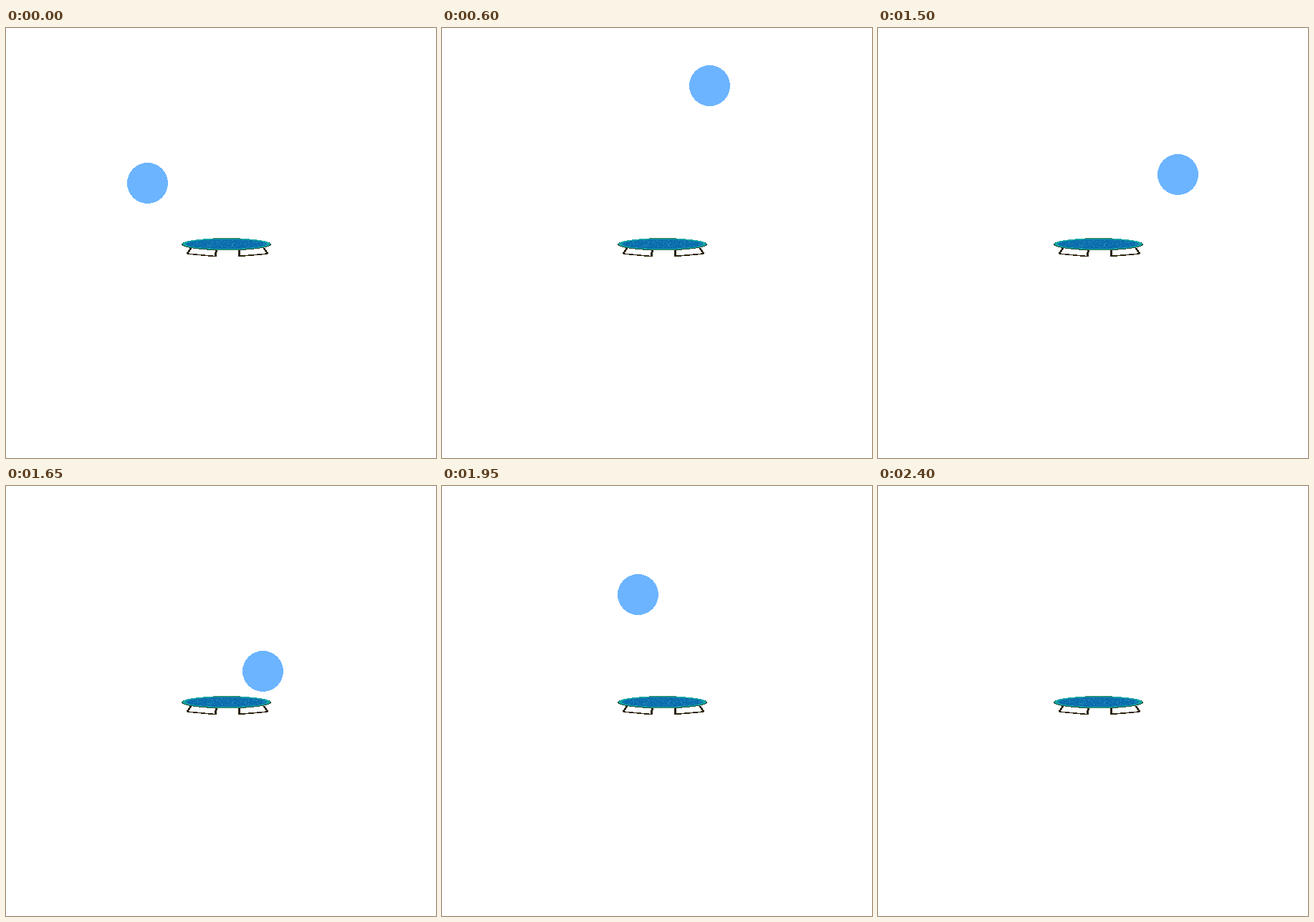
Animation, 600 px wide and 600 px high, one loop 3000 ms. Source, as an HTML page:

```html
<!DOCTYPE html>
<html lang="en">
<head>
<meta charset="utf-8">
<title>Trampoline</title>
<style>
html, body { margin: 0; width: 100%; height: 100%; overflow: hidden; background: #fff; }
svg { display: block; width: 100%; height: 100%; }
</style>
</head>
<body>
<svg viewBox="0 0 600 600" shape-rendering="crispEdges">
  <g fill="none" stroke="#2a2108" stroke-linejoin="round">
    <path d="M253 315L291 318.5M365 315L325 318.5" stroke-width="1.6"/>
    <path d="M258 307L253 315M360 307L365 315" stroke-width="2.5"/>
    <path d="M293.5 310L292 319M325 310V319" stroke-width="3"/>
  </g>
  <ellipse cx="307.5" cy="301.8" rx="62.5" ry="8.6" fill="#1f4a34"/>
  <ellipse cx="307.5" cy="301.3" rx="61.5" ry="8" fill="#14a3a4"/>
  <ellipse cx="307.5" cy="301.5" rx="56.5" ry="6.5" fill="#0a6cad"/>
  <path id="weave" stroke="#2a93c0"/>
  <path d="M289 293.5H327M292 309.5H326" stroke="#2f7a58"/>
  <circle id="ball" r="28.5" fill="#6cb4ff"/>
</svg>
<script>
const STEP = 150, LOOP = 3000, HALF = LOOP / 2, R = 28.5;
const ball = document.getElementById('ball');

// Each pass follows its key points, then rises from the last one, slowing slightly.
const passes = [
  { keys: [[169, 188], [228.8, 241]], vx: 38.75, vy: -66, g: 1 },
  { keys: [[390, 176], [330, 230], [285, 187]], vx: -40, vy: -64.75, g: 0.75 }
];

function place({ keys, vx, vy, g }, step) {
  const k = Math.max(0, step - keys.length + 1);
  const [x, y] = keys[step - k];
  return [x + vx * k, y + vy * k + g * k * k].map(Math.floor);
}

function draw(now) {
  const t = now % LOOP;
  const pass = passes[Math.floor(t / HALF)];
  const [x, y] = place(pass, Math.floor(t % HALF / STEP));
  ball.setAttribute('cx', x + R);
  ball.setAttribute('cy', y + R);
  // Once the ball has left through the top it stays away until the next pass.
  ball.style.display = y < -2 * R ? 'none' : '';
}

// Scatter light specks over the mat.
let seed = 7;
const random = () => (seed = seed * 16807 % 2147483647) / 2147483647;
let specks = '';
for (let i = 0; i < 150; i++) {
  const angle = random() * 2 * Math.PI, r = Math.sqrt(random());
  const x = Math.round(307.5 + 54 * r * Math.cos(angle));
  const y = Math.floor(301.5 + 5.5 * r * Math.sin(angle)) + 0.5;
  specks += `M${x} ${y}h1`;
}
document.getElementById('weave').setAttribute('d', specks);

const began = performance.now();
function tick() {
  draw(performance.now() - began);
  requestAnimationFrame(tick);
}
tick();
</script>
</body>
</html>
```
